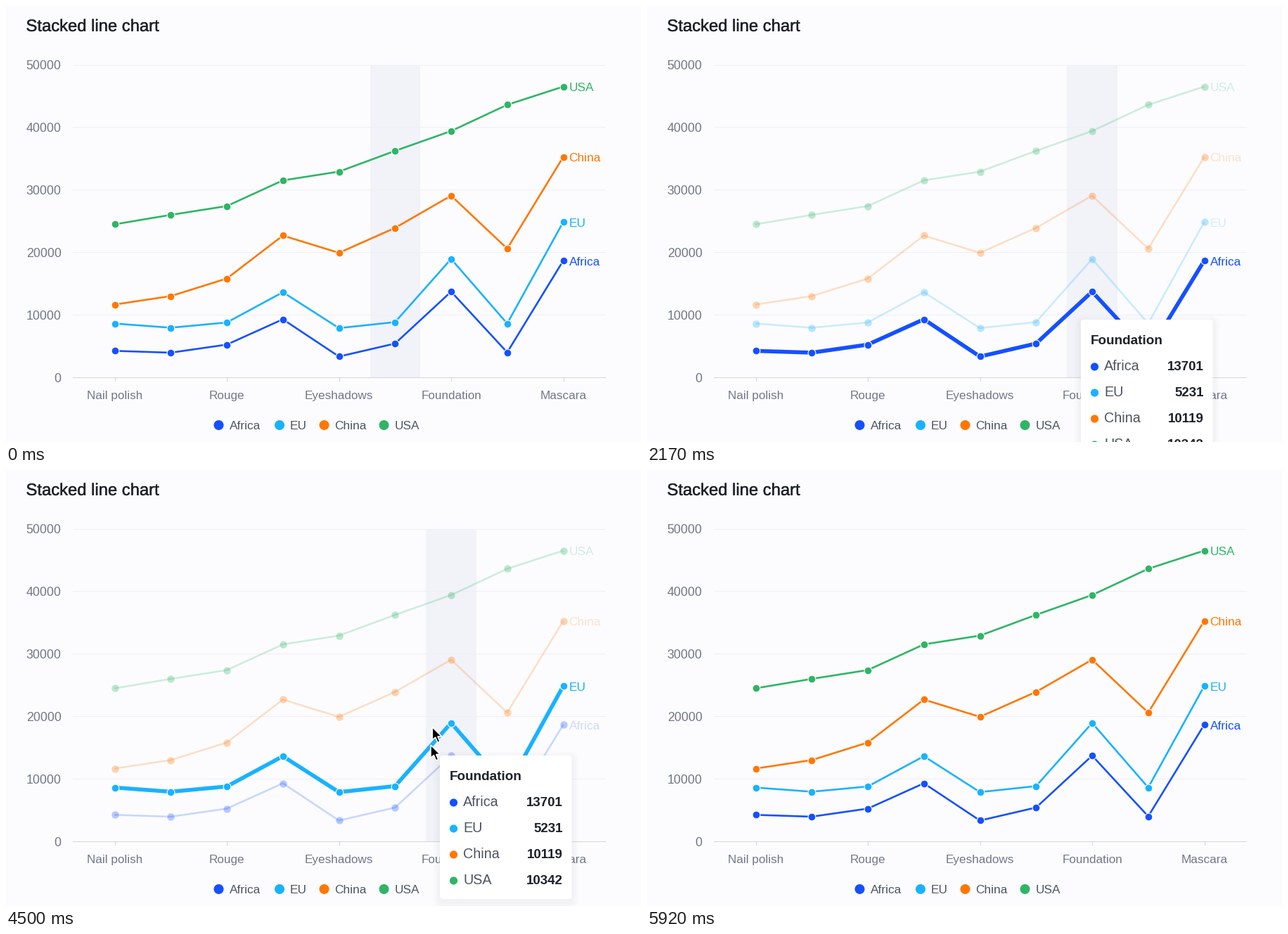
A matplotlib script for the animation above (6.26 s loop, 903 px wide and 620 px high).

```python
import numpy as np
import matplotlib.pyplot as plt
from matplotlib.animation import FuncAnimation
from matplotlib.patches import Circle, FancyBboxPatch, Polygon, Rectangle
from matplotlib.patheffects import withStroke
from matplotlib.transforms import Affine2D

W, H, DPI = 903, 620, 72          # at 72 dpi one point is one pixel
FRAMES, INTERVAL = 313, 20        # 6260 ms
STEPS_PER_SECOND = 12

BACK, INK, SOFT, GRAY = "#fcfcfe", "#1d2129", "#4e5463", "#72778a"
CATEGORIES = ["Nail polish", "Rouge", "Eyeshadows", "Foundation", "Mascara"]
COLORS = {"Africa": "#1450ff", "EU": "#19b2ff",
          "China": "#ff7700", "USA": "#2eb565"}
# Each region's own sales; the chart stacks them.
SALES = np.array([
    [4230, 3940, 5230, 9280, 3320, 5400, 13701, 3990, 18670],
    [4370, 3990, 3540, 4330, 4550, 3430, 5231, 4610, 6190],
    [3040, 5060, 7030, 9060, 12040, 15070, 10119, 11980, 10400],
    [12830, 12990, 11590, 8830, 12990, 12320, 10342, 23010, 11240],
])
HOVERED = 6
BASE, UNIT, GAP = 528, 88.9 / 10000, 79.75
BAND_W, TIP_W, TIP_H = 71.5, 187.5, 204

# Pointer moves: first step, last step, end point
MOVES = [(8, 15, (604, 431)), (29, 35, (605, 396)), (37, 41, (604, 391)),
         (54, 59, (614, 278)), (67, 72, (690, 480))]
POINTER_START, TIP_START = (689, 601), (641, 443)
TIP_OFFSET = np.array([13, 15])
# Highlighted region: first step, end step, row
FOCUS = [(16, 29, 0), (37, 55, 1), (58, 68, 2)]
ENTER, BLINK, TRAIL, LEAVE = 8, 26, 54, 70

plt.rcParams["font.family"] = "Liberation Sans"
fig = plt.figure(figsize=(W / DPI, H / DPI), dpi=DPI, facecolor=BACK)
ax = fig.add_axes([0, 0, 1, 1])
ax.set(xlim=(0, W), ylim=(H, 0))
ax.axis("off")


def xpos(i):
    return 154.5 + GAP * i


def ypos(v):
    return BASE - UNIT * v


def label(x, mid, text, size, color, **kw):
    """Text whose capitals are centred on mid."""
    return ax.text(x, mid + 0.35 * size, text, fontsize=size, color=color,
                   va="baseline", **kw)


def glide(start, step):
    """Position after all moves so far, each easing out."""
    pos = np.array(start, float)
    for first, last, end in MOVES:
        p = np.clip((step - first) / (last - first), 0, 1)
        pos += (np.array(end) - pos) * (1 - (1 - p) ** 2)
    return pos


def draw_frame():
    title = label(28.5, 27.5, "Stacked line chart", 23.8, INK)
    title.set_path_effects([withStroke(linewidth=0.4, foreground=INK)])
    for v in range(0, 60000, 10000):
        y = ypos(v)
        ax.plot([95, 852], [y, y], lw=1, zorder=1,
                color="#eeeef6" if v else "#d2d5dc")
        label(78.5, y + 0.5, str(v), 17.7, GRAY, ha="right")
    for i, name in enumerate(CATEGORIES):
        x = xpos(2 * i)
        ax.plot([x, x], [BASE, BASE + 5], lw=1, color="#d2d5dc", zorder=1)
        label(x, 553, name, 17.1, GRAY, ha="center")
    for x, (name, color) in zip((302.5, 389, 452.5, 537.5), COLORS.items()):
        ax.add_patch(Circle((x, 596), 7, fc=color, lw=0))
        label(x + 15, 596, name, 17.2, SOFT)


def make_series():
    xs = xpos(np.arange(SALES.shape[1]))
    parts = []
    for (name, color), total in zip(COLORS.items(), SALES.cumsum(axis=0)):
        ys = ypos(total)
        line, = ax.plot(xs, ys, color=color, lw=2.6, zorder=3,
                        solid_joinstyle="round", solid_capstyle="butt")
        dots, = ax.plot(xs, ys, "o", color=color, ms=10.8, mec="white",
                        mew=1.1, zorder=4)
        text = label(800.5, ys[-1] + 0.5, name, 17.2, color, zorder=4)
        parts.append((line, dots, text))
    return parts


def make_tip(shift):
    trans = shift + ax.transData
    parts = []

    def box(grow, drop, **kw):
        parts.append(ax.add_patch(FancyBboxPatch(
            (-grow, drop - grow), TIP_W + 2 * grow, TIP_H + 2 * grow,
            boxstyle=f"round,pad=0,rounding_size={4 + grow}",
            lw=0, transform=trans, **kw)))

    for grow in range(10, 0, -2):
        box(grow, 4, fc="#202040", alpha=0.009, zorder=6)
    box(0, 0, fc="white", zorder=7)
    style = dict(transform=trans, zorder=8)
    parts.append(label(14, 28, CATEGORIES[HOVERED // 2], 18.9, INK,
                       weight="bold", **style))
    for i, (name, color) in enumerate(COLORS.items()):
        y = 65.5 + 37 * i
        parts.append(ax.add_patch(
            Circle((19.5, y + 1.5), 5.6, fc=color, lw=0, **style)))
        parts.append(label(33, y, name, 19.8, SOFT, **style))
        parts.append(label(TIP_W - 13, y, str(SALES[i, HOVERED]), 18.7, INK,
                           weight="bold", ha="right", **style))
    return parts


def make_pointer(shift):
    shape = [(0, 0), (0, 18.5), (4.3, 14.5), (7.6, 22), (10.8, 20.6),
             (7.6, 13.4), (13.4, 13.4)]
    return ax.add_patch(Polygon(shape, fc="black", ec="white", lw=1.6,
                                transform=shift + ax.transData, zorder=10))


draw_frame()
band = ax.add_patch(Rectangle((0, ypos(50000)), BAND_W, UNIT * 50000,
                              fc="#f2f2f9", lw=0, zorder=0.5))
series = make_series()
tip_shift, pointer_shift, trail_shift = Affine2D(), Affine2D(), Affine2D()
tip = make_tip(tip_shift)
pointer = make_pointer(pointer_shift)
trail = make_pointer(trail_shift)
trail_shift.translate(*glide(POINTER_START, TRAIL + 0.6))


def update(n):
    step = (n * INTERVAL + 14) * STEPS_PER_SECOND // 1000

    band.set_x(xpos(HOVERED - (step < ENTER)) - BAND_W / 2)
    band.set_visible(step < LEAVE)

    focus = next((row for a, b, row in FOCUS if a <= step < b), None)
    for i, (line, dots, text) in enumerate(series):
        dim = focus is not None and i != focus
        line.set_linewidth(5.6 if i == focus else 2.6)
        line.set_alpha(0.22 if dim else 1)
        dots.set_alpha(0.3 if dim else 1)
        text.set_alpha(0.2 if dim else 1)

    tip_shift.clear().translate(*(glide(TIP_START, step) + TIP_OFFSET))
    for part in tip:
        part.set_visible(ENTER <= step < LEAVE)

    pointer_shift.clear().translate(*glide(POINTER_START, step))
    pointer.set_visible(0 < step <= LEAVE and step != BLINK)
    trail.set_visible(step == TRAIL)
    return []


anim = FuncAnimation(fig, update, frames=FRAMES, interval=INTERVAL,
                     init_func=lambda: update(0), repeat=True,
                     repeat_delay=0, blit=False)
plt.show()
```
